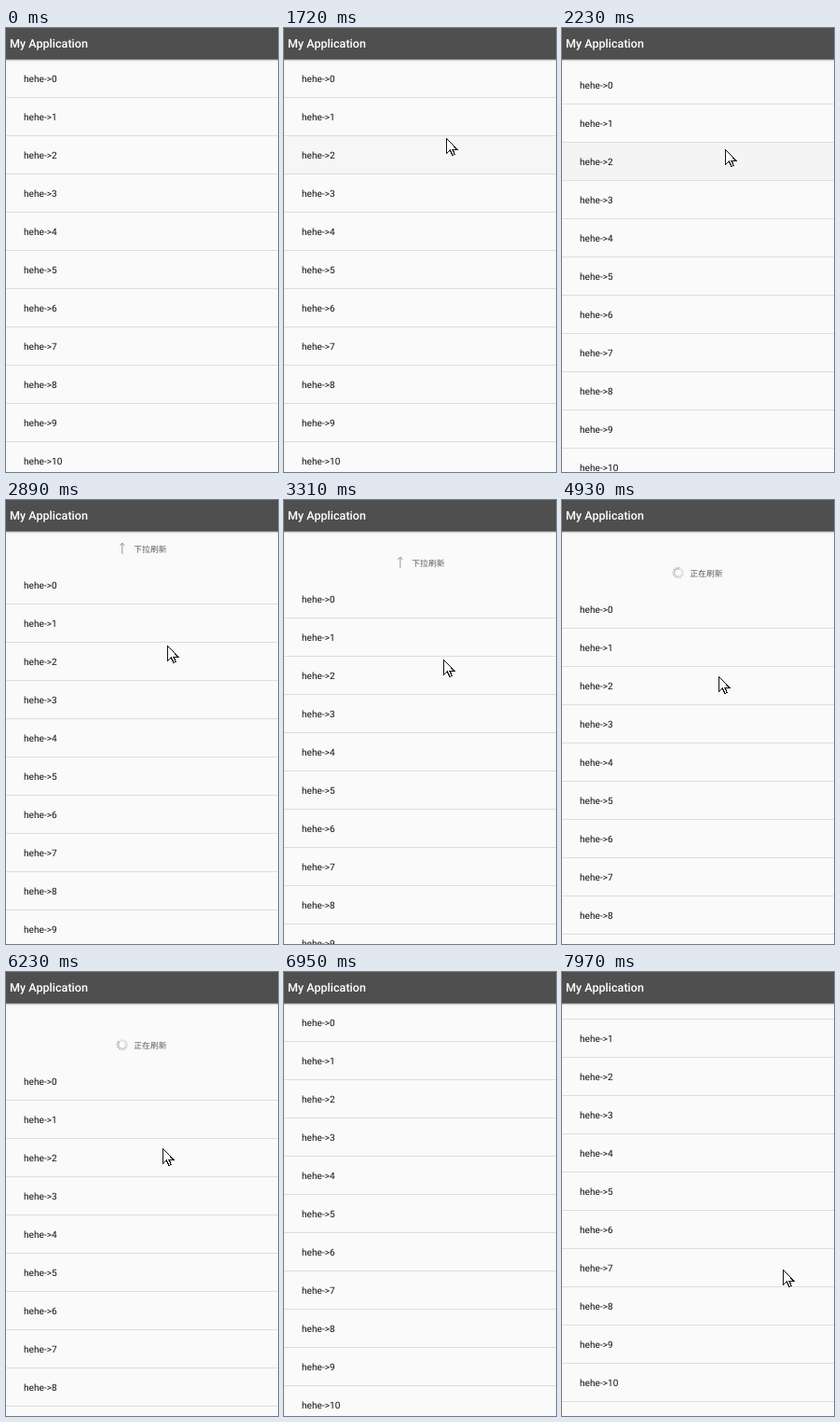
An HTML page that plays this animation: 292x476 px, repeating every 8 s.

```html
<!DOCTYPE html>
<html lang="zh">
<head>
<meta charset="utf-8">
<title>Pull to refresh</title>
<style>
html, body { margin: 0; width: 100%; height: 100%; overflow: hidden; background: #fafafa; }
svg { display: block; }
text { font-family: Roboto, sans-serif; text-rendering: geometricPrecision; }
#rows text { font-size: 10.15px; fill: #111; }
#label { font: 8.8px "Noto Sans CJK SC", "Noto Sans CJK", sans-serif; fill: #5c5c5c; }
#title { font-size: 12.6px; font-weight: 500; fill: #fff; }
</style>
</head>
<body>
<svg width="292" height="476" viewBox="0 0 292 476">
  <rect width="292" height="476" fill="#fafafa"/>
  <g id="list">
    <text id="label" x="137.3" y="18.9"></text>
    <path id="arrow" d="M0 5.8V-5.8M-2.5 -3L0 -5.8L2.5 -3" fill="none" stroke="#808080" stroke-width=".8"/>
    <g id="spinner" stroke="#999" stroke-width="1.5"></g>
    <rect id="press" y="116" width="292" height="40" fill="#f4f4f4"/>
    <g id="rows"></g>
  </g>
  <rect width="292" height="33" fill="#4f4f4f"/>
  <rect y="33" width="292" height="1" fill="#707070"/>
  <rect y="34" width="292" height="1" fill="#cfcfcf"/>
  <rect y="35" width="292" height="1" fill="#efefef"/>
  <text id="title" x="4" y="21">My Application</text>
  <path id="cursor" d="M.5 .5V16.5L4.3 12.9L6.9 18.5L9.3 17.4L6.8 12H11.6Z" fill="#fff" stroke="#111"
    shape-rendering="crispEdges"/>
</svg>
<script>
const LOOP = 8000, TICK = 130, ROW = 41;
const HEADER = 63, REFRESH = 4930, SWIPE = 7570;
const $ = id => document.getElementById(id);
const ramp = (t, from, to) => Math.min(1, Math.max(0, (t - from) / (to - from)));
const mix = (a, b, p) => a + (b - a) * p;

// The finger's drag: [time, x, y]
const drag = [[1710, 174, 118], [2230, 175, 130], [2880, 173, 156.2], [3660, 168, 185.6], [4100, 168, 189.2]];

function pointer(t) {
  if (t < drag[0][0]) {
    const p = ramp(t, 150, 1320);
    return [mix(232, 174, 1 - (1 - p) ** 2), mix(225, 118, p)];
  }
  if (t >= SWIPE - TICK) {
    const p = ramp(t, 7690, 7950);
    return [mix(242, 237, p), mix(382, 319, p)];
  }
  const i = Math.max(1, drag.findIndex(k => k[0] > t));
  const [a, b] = t < 4100 ? [drag[i - 1], drag[i]] : drag.slice(-2);
  const p = ramp(t, a[0], b[0]), leave = ramp(t, 6200, 6460);
  return [mix(a[1], b[1], p) + 28 * leave, mix(a[2], b[2], p) - 15 * leave];
}

function pull(t, y, busy) {
  if (busy) return HEADER * (1 - ramp(t, 6560, 6910)) ** 2 - 24 * ramp(t, 7820, 7950);
  if (t < drag[0][0]) return 0;
  // The list lags at first, then follows the finger
  const d = Math.max(0, y - 119.2);
  return d * Math.min(1, d / 17);
}

for (let i = 0; i < 12; i++) {
  $('rows').innerHTML += `<text x="19" y="${58 + ROW * i}">hehe-&gt;${i}</text>
    <rect y="${74 + ROW * i}" width="292" height="1" fill="#dddddd"/>`;
  $('spinner').innerHTML +=
    `<path d="M0 -3.4V-6.2" transform="rotate(${30 * i})" opacity="${0.25 + 0.05 * i}"/>`;
}

const place = (id, x, y, turn = 0) =>
  $(id).setAttribute('transform', `translate(${x} ${y}) rotate(${turn})`);
const show = (id, on) => $(id).setAttribute('visibility', on ? 'visible' : 'hidden');

function draw(now) {
  const time = now % LOOP;
  const t = Math.floor((time - 20) / TICK) * TICK + 20;
  const busy = time >= REFRESH;
  const [x, y] = pointer(t);
  const flip = ramp(t, 3530, 3695);

  place('list', 0, Math.round(pull(t, y, busy)));
  place('arrow', 124.8, 15, 180 * flip);
  place('spinner', 124.7, 15, 30 * t / TICK);
  place('cursor', Math.round(x), Math.round(y));
  $('label').textContent = busy ? '正在刷新' : flip ? '释放刷新' : '下拉刷新';
  $('press').setAttribute('opacity', ramp(t, 1580, 1840) * (1 - ramp(t, 2230, 2490)));
  show('arrow', !busy);
  show('spinner', busy);
  show('cursor', time >= 150 && time < 6590 || time >= SWIPE);
}

const begin = performance.now();
function tick() {
  draw(performance.now() - begin);
  requestAnimationFrame(tick);
}
tick();
</script>
</body>
</html>
```
